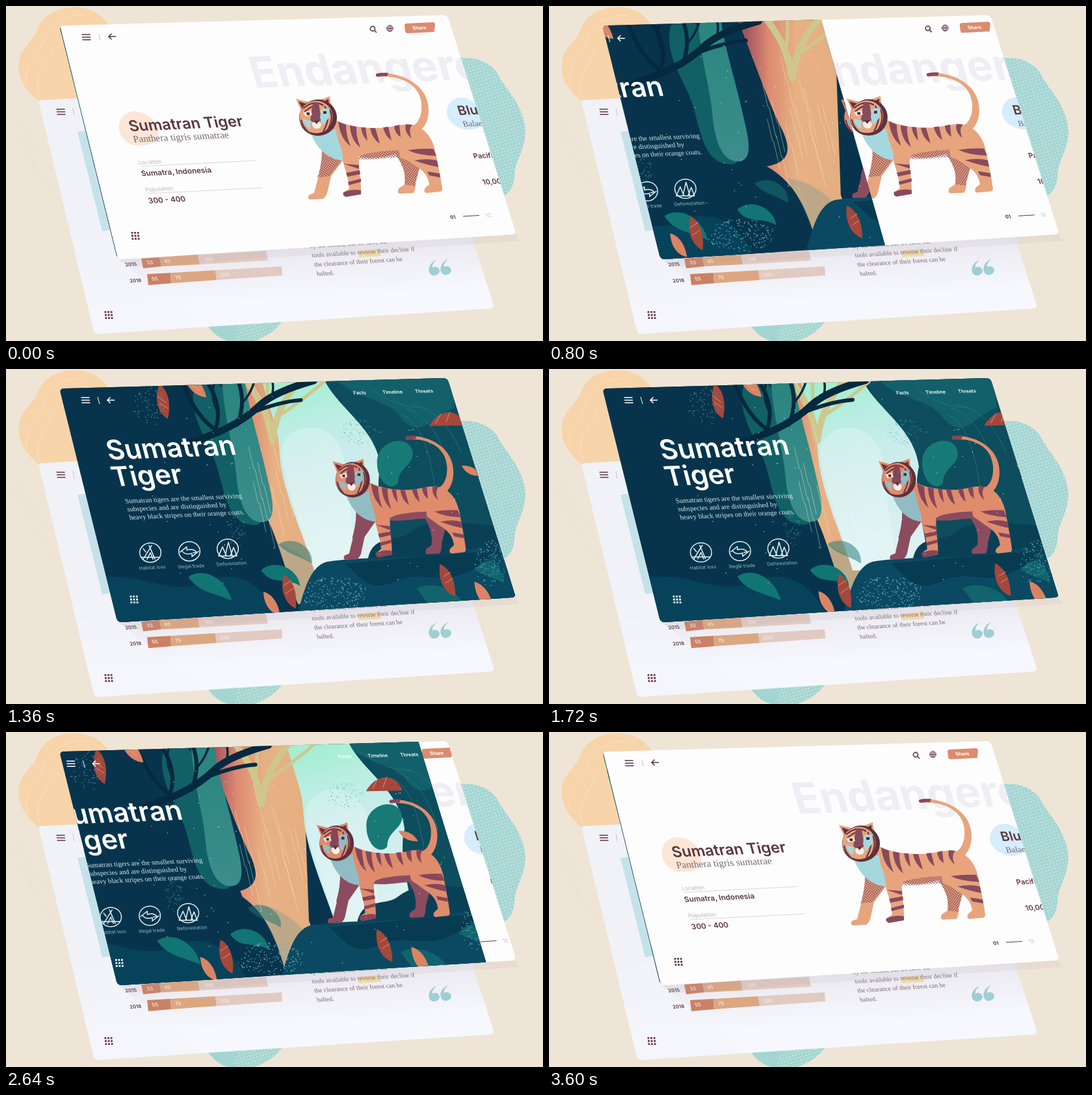
Write an HTML page that moves like this. It is 826 by 516 pixels and loops after 3640 ms.

```html
<!DOCTYPE html>
<html lang="en">
<head>
<meta charset="utf-8">
<title>Endangered species</title>
<style>
html, body { margin: 0; width: 100%; height: 100%; overflow: hidden; background: #efe5d6 }
svg { display: block; width: 826px; height: 516px }
text { font-family: Inter, sans-serif }
.serif { font-family: "Liberation Serif", serif }
.line { fill: none; stroke: currentColor; stroke-width: 1.6 }
.round { stroke-linecap: round; stroke-linejoin: round }
#whiteTiger { --fur: #e8a47d; --far: #e8a47d; --spots: url(#stipple); --chest: #a5d8de; --stripe: #874b5c }
#darkTiger { --fur: #de8c6c; --far: #8c4c60; --spots: #8c4c60; --chest: #92bcc4; --stripe: #874559 }
</style>
</head>
<body>
<svg viewBox="0 0 826 516">
<defs>
  <path id="sheet" d="M90 30L672 14Q679 14 681 20L783 345Q785 351 778 352L178 390Q172 390 170 384L84 37Q82 30 90 30Z"/>
  <clipPath id="card"><use href="#sheet"/></clipPath>
  <clipPath id="reveal"><polygon id="wipe"/></clipPath>
  <pattern id="cream" width="7" height="7" patternUnits="userSpaceOnUse" patternTransform="rotate(28)">
    <circle cx="2" cy="2" r="1.05" fill="#e9e6d6"/><circle cx="5.5" cy="5.3" r="1.05" fill="#e9e6d6"/>
  </pattern>
  <pattern id="stipple" width="3" height="3" patternUnits="userSpaceOnUse" patternTransform="rotate(35)">
    <rect width="1.9" height="1.9" fill="#874b5c"/>
  </pattern>
  <linearGradient id="shade" x1="0" y1="0" x2=".1" y2="1">
    <stop offset=".55" stop-color="#dedce2"/><stop offset=".72" stop-color="#eceaf0"/><stop offset=".9" stop-color="#f6f8fd"/>
  </linearGradient>
  <linearGradient id="bark">
    <stop offset=".1" stop-color="#a35560"/><stop offset=".3" stop-color="#dc8a70"/><stop offset=".55" stop-color="#e7b184"/><stop offset="1" stop-color="#e4ae80"/>
  </linearGradient>
  <linearGradient id="sky" x1="0" y1="0" x2=".2" y2="1">
    <stop offset="0" stop-color="#98edc9"/><stop offset=".3" stop-color="#b8eee0"/><stop offset=".5" stop-color="#c9eceb"/><stop offset="1" stop-color="#dcf1f2"/>
  </linearGradient>
  <linearGradient id="haze" x1="0" y1="0" x2="0" y2="1">
    <stop offset="0" stop-color="#2a857f"/><stop offset="1" stop-color="#3b8d8c"/>
  </linearGradient>
  <path id="menu" class="line" d="M-6.5-4H6.5M-6 0H7M-5.5 4H7.5"/>
  <path id="back" class="line" d="M6 0H-5M-.5-4.5L-5 0L-.5 4.5"/>
  <path id="grid" fill="none" stroke="currentColor" stroke-width="2.8" stroke-dasharray="2.8 1.8" d="M-6.5-4.6h12.1M-6 0h12.1M-5.5 4.6h12.1"/>
  <path id="leaf" d="M-4-27C8-18 15 0 9 27C-3 20-14 2-4-27Z"/>
  <path id="quote" d="M-2-11C-12-7-17 4-11 11C-4 17 6 9 2 3C-1-1-5-1-8 1C-9-3-6-7-2-11Z"/>

  <g id="tiger">
    <path fill="var(--fur)" d="M570 104C602 100 650 118 650 160C650 190 630 200 616 197L610 186C630 190 641 174 639 150C636 118 602 106 571 109Z"/>
    <path fill="var(--stripe)" d="M570 104Q580 102 588 103L586 108Q578 108 571 109Q567 107 570 104Z"/>
    <path fill="var(--far)" d="M486 222C486 250 478 270 474 288L466 291Q463 297 468 298L488 297Q493 292 494 288L500 262L518 238L510 215Z"/>
    <path fill="var(--spots)" d="M486 222C486 240 482 254 479 264L498 262L516 238Z"/>
    <path fill="var(--far)" d="M598 225C606 240 616 252 613 275L604 281Q601 288 606 289L627 288Q631 280 630 272L638 244Z"/>
    <path fill="var(--spots)" d="M600 230C608 242 616 254 613 275L629 277L636 247Z"/>
    <path fill="var(--fur)" d="M500 172C520 184 545 188 570 188C595 188 610 179 628 184C646 189 656 205 660 222C664 242 668 260 671 281Q671 286 667 286L647 288Q641 286 645 280L651 275C649 260 640 252 630 246C618 239 608 230 600 228C580 234 560 236 543 232C542 255 547 270 546 290L523 294Q517 292 521 286L528 281C526 260 520 248 518 238C500 236 480 210 470 196Z"/>
    <path fill="var(--spots)" d="M543 236C540 228 566 224 604 222L606 233C585 233 570 238 543 236Z"/>
    <path fill="var(--chest)" d="M468 194C476 216 492 236 518 238C520 222 508 208 508 190Z"/>
    <g fill="var(--stripe)">
      <path d="M511 178L523 183Q523 200 530 216Q514 204 511 178ZM529 184L539 186Q538 200 545 218Q530 206 529 184ZM546 187L553 187L556 208Q548 200 546 187ZM560 188L568 188L575 212Q563 204 560 188ZM580 187L588 186L593 207Q583 200 580 187ZM597 185L605 183L607 202Q598 196 597 185ZM615 182L625 183Q618 190 624 204Q612 194 615 182Z"/>
      <path d="M657 220Q638 219 618 222Q634 230 662 231ZM663 238Q648 234 628 238Q648 245 665 248ZM667 258L648 255L651 261L668 264ZM519 243L543 245L543 251ZM523 257L544 253L545 259L525 263ZM526 271L546 266L546 271L527 276ZM519 287Q534 281 546 284L546 290L523 294Q517 292 519 287Z"/>
    </g>
    <path fill="var(--fur)" d="M446 143L466 148L456 166ZM479 146L498 139L501 162Z"/>
    <path fill="#6a3442" d="M450 147L463 151L457 161ZM485 149L496 143L497 159Z"/>
    <ellipse cx="480" cy="172" rx="29" ry="28" fill="#5d303d"/>
    <ellipse cx="477" cy="171" rx="25.5" ry="25" fill="var(--fur)"/>
    <g fill="none" stroke="#6a3442" stroke-width="2.2">
      <path d="M457 158Q473 144 488 153M459 163Q473 151 480 155M496 157Q506 171 495 190M490 154Q501 172 488 193M454 175Q456 186 464 193"/>
    </g>
    <path fill="var(--stripe)" d="M472 149L481 149L485 176L475 181L468 176Z"/>
    <path fill="#f1e5d9" d="M457 164L469 161L471 168L461 170ZM484 161L496 158L494 167L485 169Z"/>
    <path fill="var(--chest)" d="M485 159L498 157L497 172L487 184L483 172ZM456 174L469 177L468 190Q459 185 456 174Z"/>
    <path fill="#4d2936" d="M462 164h5v4h-4ZM488 162h5v4h-5Z"/>
    <path fill="#f6eee6" d="M471 180Q478 175 485 181Q485 190 477 189Q470 187 471 180Z"/>
    <path fill="#5d303d" d="M473 177L482 176L478 182Z"/>
  </g>
</defs>

<rect width="826" height="516" fill="#efe5d6"/>
<path fill="#f8d4aa" d="M50 146C28 130 16 105 20 86C22 65 42 54 48 37C58 9 88 0 112 2C138 5 152 18 162 36L180 160Z"/>
<g fill="none" stroke="#fae1c3"><path d="M34 125C22 92 50 80 58 52C66 27 95 12 122 14M52 142C38 104 70 88 72 62"/><path stroke="#e8ddd0" d="M0 178C28 200 38 250 75 290M12 166C32 196 46 226 68 250"/></g>
<g id="teal"><path id="blob" fill="#a2d6d6" d="M690 82C715 76 745 84 757 106C768 128 792 148 798 184C802 220 782 236 782 262C780 286 768 298 740 297L690 250Z"/><use href="#blob" style="fill:url(#cream)"/>
<path d="M690 82C715 76 745 84 757 106C768 128 792 148 798 184C802 220 782 236 782 262C780 286 768 298 740 297L690 250Z" fill="url(#cream)"/></g>
<path fill="#a3d6d2" d="M300 480C315 498 322 512 346 517H378C396 512 418 500 428 480Z"/>
<path fill="url(#cream)" d="M360 480L350 517H378C396 512 418 500 428 480Z"/>

<g id="rear" color="#6a3444">
  <path fill="url(#shade)" d="M56 145L640 120L750 460Q751 465 745 466L142 505Q137 505 135 500L51 151Q49 145 56 145Z"/>
  <path fill="#f4f6fc" d="M56 145L110 142L176 392L300 494L142 505Q137 505 135 500L51 151Q49 145 56 145Z" opacity=".85"/>
  <path fill="#c5e2ea" d="M110 194L125 192L162 345L148 347Z"/>
  <use href="#menu" x="84" y="163"/><path stroke="#cfc5cb" d="M103 157L105 169"/>
  <use href="#grid" x="158" y="476"/>
  <path fill="#cb8166" d="M208 389L236 387L239 401L211 404ZM217 413L253 411L254 427L219 430Z"/>
  <path fill="#dca780" d="M236 387L295 383L298 398L239 401ZM253 411L322 407L324 422L254 427Z"/>
  <path fill="#e0cac2" d="M295 383L400 377L403 392L298 398ZM322 407L424 401L425 415L324 422Z"/>
  <path fill="#f0d9ad" d="M541 377L574 374L577 385L543 387Z"/>
  <g fill="#9fced3"><use href="#quote" x="664" y="402"/><use href="#quote" x="682" y="401"/></g>
</g>

<path d="M172 391L784 352L790 362L190 402Z" fill="#aaa0b0" opacity=".13"/>
<g clip-path="url(#card)">
  <use href="#sheet" fill="#fdfdfe"/>
  <g id="page" color="#5a3540">
    <g id="ghost"></g>
    <path fill="#fde6d5" d="M174 184C176 162 198 158 214 166C232 176 240 192 232 206C222 218 196 218 184 208C176 201 173 193 174 184Z"/>
    <path fill="#d5edfc" d="M678 162C680 142 700 136 716 146C732 156 738 170 732 182C722 195 700 192 688 182C681 176 678 170 678 162Z"/>
    <use href="#menu" x="123" y="48"/><path stroke="#cbbfc5" d="M143 43L145 53"/><use href="#back" x="163" y="47"/>
    <g class="line" stroke-width="1.2"><circle cx="564" cy="35" r="3.6"/><path d="M567 38L570 41"/><g stroke-width="1"><circle cx="590.500" cy="34.500" r="4.800"/><path d="M586 34.500H595M590.500 30V39M588.500 31Q586.500 35 589 39M592.500 31Q594 35 592 39"/></g></g>
    <path fill="#dc8b6e" d="M615 27L657 25Q659 25 660 28L659 39Q659 40 657 40L617 42Q615 42 614 39L613 29Z"/>
    <path stroke="#dcd5dc" d="M207 247L384 238M216 289L394 280"/>
    <use href="#grid" x="199" y="354"/>
    <path stroke="#5a3540" d="M703 324L728 322.500"/>
  </g>
  <use id="whiteTiger" href="#tiger"/>

  <g clip-path="url(#reveal)">
    <rect width="826" height="516" fill="#07344c"/>
    <g data-k="-.1"><path fill="#0d4d5d" d="M470 0H826V400H520C590 280 560 100 470 0Z"/><path fill="#126069" d="M500 0C520 50 590 40 610 78C640 110 660 70 690 60V0Z"/></g>
    <g data-k=".18">
      <path fill="url(#bark)" d="M318 10H470L480 290Q500 340 470 362H442C430 315 410 270 366 246C400 240 405 222 390 190C370 150 345 80 318 10Z"/>
      <path fill="#9fa18c" opacity=".55" d="M396 264C425 266 460 285 482 318L488 345Q472 366 442 362C430 320 415 292 396 264Z"/>
    </g>
    <g data-k="-.45">
      <path fill="url(#sky)" d="M392 0H485C500 56 570 84 578 150C566 200 592 250 592 310H476C452 235 424 180 422 120C420 84 404 60 392 0Z"/>
      <path fill="#fff" opacity=".22" d="M426 130C424 84 500 70 520 130C532 200 530 250 550 310H476C460 245 432 190 426 130Z"/>
    </g>
    <g data-k=".2">
      <g class="round" fill="none" stroke="#cec78d"><path stroke-width="10" d="M407 105C403 75 394 52 370 20M409 110C414 70 426 48 452 15"/><path stroke-width="5" d="M414 75Q440 60 488 20M399 65Q404 36 400 15"/></g>
      <path fill="#177a76" d="M570 145C568 112 615 98 624 125C630 148 602 150 602 176C590 190 570 172 570 145Z"/>
      <g fill="none" stroke="#2a8584" stroke-width=".8" opacity=".8"><path d="M606 70Q646 80 660 190M614 60Q660 75 680 150M622 55Q670 60 700 130M560 30Q600 60 640 60"/></g>
      <path fill="#0a4055" d="M555 300C560 250 600 270 620 252C650 230 690 235 780 245V320Z"/>
    </g>
    <g data-k=".58">
      <path fill="#07344c" d="M60 0H345L355 120L375 190L402 235C430 300 440 370 470 400H60Z"/>
      <path fill="#116066" d="M288 26C345 0 345 70 362 110C385 160 400 238 385 240C340 244 335 195 322 150C312 115 275 70 288 26Z"/>
      <path fill="url(#haze)" d="M330 20H365C374 74 388 112 403 182C412 220 408 236 390 236C365 235 355 200 352 165C348 120 334 80 330 20Z"/>
      <path fill="#1b7774" d="M417 270C440 255 472 275 468 300C446 286 430 286 417 270Z" opacity=".5"/>
      <path fill="#06435a" d="M80 338C180 290 240 355 300 330C350 304 400 330 424 400H80Z"/>
      <path fill="#117574" d="M278 320C300 305 335 320 345 357C320 345 294 345 278 320ZM390 310C410 292 446 306 450 334C428 320 406 334 390 310Z"/>
    </g>
    <g data-k=".85">
      <g class="round" fill="none" stroke="#05293f"><path stroke-width="11" d="M268 118C320 100 355 87 388 55Q410 35 470 18"/><path stroke-width="6" d="M352 86Q368 48 350 10M315 102Q335 60 302 15M378 66Q420 50 450 48M325 98Q288 76 268 20"/><path stroke-width="3.500" d="M362 50Q376 34 380 12M320 62Q310 40 318 18M405 43Q410 26 404 14"/></g>
    </g>
    <g data-k=".3">
      <path fill="#0a4961" d="M440 400C456 350 462 306 492 297C560 286 640 296 710 278C750 270 790 300 810 400Z"/>
      <path fill="#07374f" d="M520 300C545 320 555 345 595 328C640 308 660 332 700 316C720 308 740 298 750 280L650 288Z" opacity=".8"/>
      <path fill="#15706f" d="M630 338C655 325 690 340 700 358L650 364ZM720 310C735 285 760 295 765 330Z" opacity=".7"/>
      <use id="darkTiger" href="#tiger" transform="translate(94.800 2) scale(.911 .98)"/>
    </g>
    <g data-k=".25" id="sparks"></g>
    <g data-k="1.180" id="fore">
      <g fill="#a5483c"><use href="#leaf" x="235" y="50"/><use href="#leaf" transform="translate(429 343) rotate(-6)"/><use href="#leaf" transform="translate(672 326) rotate(-12)"/></g>
      <g fill="#db8464"><use href="#leaf" transform="translate(283 24) rotate(-28)"/><use href="#leaf" transform="translate(402 362) rotate(-22) scale(.8)"/><use href="#leaf" transform="translate(728 349) rotate(-22) scale(.9)"/></g>
      <path fill="#a5483c" d="M646 88C660 62 690 58 702 87Z"/><path fill="#db8464" d="M696 149Q716 148 726 165Q704 166 696 149Z"/>
      <g fill="none" stroke="#f1b795" stroke-width=".7"><path d="M228 42l13 10M231 52l13 9M422 334l12-8M425 346l12-8M668 320l11-7M671 330l11-7M276 15l13 11M281 25l13 9M656 84l8-15M672 82l6-16"/></g>
    </g>
    <g data-k=".29" id="nav" color="#fff">
      <use href="#menu" x="122" y="48"/><path stroke="#fff" d="M141 43L144 54"/><use href="#back" x="161" y="48"/><use href="#grid" x="197" y="355"/>
    </g>
    <g data-k="1" id="title"></g>
    <g data-k=".74" id="facts">
      <g class="round" fill="none" stroke="#e4f1f3" stroke-width="1.500">
        <g id="rings"></g>
        <path d="M208 293L221 272M226 293L217 272M205 290H233M214 293L219 283L223 293M208 277l4 5M265 282l10-8v5q10-3 15 3l-5 1M293 281l-10 8v-5q-10 3-15-3M324 288l6-14 6 14ZM334 288l5-21 6 21ZM342 288l5-13 5 13Z"/>
      </g>
    </g>
  </g>
</g>
</svg>
<script>
const DURATION = 3640, $ = id => document.getElementById(id);
const mix = (a, b, p) => a + (b - a) * p;

const add = (parent, tag, attrs) => {
  const node = document.createElementNS("http://www.w3.org/2000/svg", tag);
  for (const name in attrs) node.setAttribute(name, attrs[name]);
  return $(parent).appendChild(node);
};

// Sets text into the tilted plane of the cards.
const write = (parent, x, y, size, fill, words, weight = 400, family = "") => {
  const rise = -.029 - .035 * Math.min(1, (y - 31) / 359), lean = .248 + .06 * (x - 83) / 600;
  add(parent, "text", {
    transform: `matrix(1 ${rise} ${lean} .98 ${x} ${y})`,
    "font-size": size, "font-weight": weight, fill, class: family
  }).textContent = words;
};

const ink = "#5a3540", pale = "#b9b4c4", gray = "#75666f";
write("ghost", 382, 126, 67, "#eeeef4", "Endangered", 700);
write("page", 191, 193, 23.5, ink, "Sumatran Tiger", 600);
write("page", 197, 210, 15.2, gray, "Panthera tigris sumatrae", 400, "serif");
write("page", 205, 244, 8.6, pale, "Location");
write("page", 209, 262, 11.6, ink, "Sumatra, Indonesia", 600);
write("page", 215, 286, 8.6, pale, "Population");
write("page", 220, 304, 11.6, ink, "300 - 400", 600);
write("page", 697, 168, 20, ink, "Blue Whale", 600);
write("page", 704, 186, 13, gray, "Balaenoptera musculus", 400, "serif");
write("page", 720, 235, 11, ink, "Pacific Ocean", 600);
write("page", 734, 275, 11, ink, "10,000 - 25,000", 600);
write("page", 684, 328, 7.5, ink, "01", 700);
write("page", 739, 325, 7.5, pale, "12");
write("page", 626, 36.5, 7.5, "#fff", "Share", 700);

["by the threats, but we have the", "tools available to reverse their decline if",
 "the clearance of their forest can be", "halted."].forEach((words, i) =>
  write("rear", 467.5 + 3.8 * i, 373 + 14.2 * i, 9.85, gray, words, 400, "serif"));
[[184, 401, "2015", ink], [191, 426, "2018", ink], [217, 398, "33"], [244, 396, "45"], [306, 393, "106"],
 [225, 423, "55"], [261, 421, "75"], [330, 417, "200"]].forEach(([x, y, words, fill]) =>
  write("rear", x, y, 7.6, fill || "#f6e8df", words, 600));

write("nav", 535, 39.5, 7.4, "#fff", "Facts", 600);
write("nav", 580, 38.5, 7.4, "#fff", "Timeline", 600);
write("nav", 630, 37, 7.4, "#fff", "Threats", 600);
write("title", 154, 140, 42.5, "#fff", "Sumatran", 600);
write("title", 162, 181, 42.5, "#fff", "Tiger", 600);
["Sumatran tigers are the smallest surviving", "subspecies and are distinguished by",
 "heavy black stripes on their orange coats."].forEach((words, i) =>
  write("facts", 181 + 3.2 * i, 207 + 12.6 * i, 10.7, "#dcebee", words, 400, "serif"));
[[219, 283, "Habitat loss"], [279, 281, "Illegal trade"], [338, 277, "Deforestation"]].forEach(([x, y, words]) => {
  add("rings", "ellipse", { cx: x, cy: y, rx: 16.3, ry: 14.8 });
  write("facts", x - 16.5, y + 26.5, 7.3, "#8fbac4", words);
});

let seed = 7;
const random = () => (seed = seed * 16807 % 2147483647) / 2147483647;
const scatter = (parent, cx, cy, rx, ry, count, stroke, width) => {
  let d = "";
  while (count--) {
    const a = random() * 6.283, r = Math.sqrt(random());
    d += `M${(cx + rx * r * Math.cos(a)).toFixed(1)} ${(cy + ry * r * Math.sin(a)).toFixed(1)}h.01`;
  }
  add(parent, "path", { d, stroke, "stroke-width": width, class: "round" });
};
scatter("sparks", 440, 200, 260, 170, 75, "#d9f2ee", 1.3);
scatter("sparks", 540, 98, 28, 20, 65, "#58b0bb", 1.3);
scatter("sparks", 745, 300, 26, 36, 140, "#68b6bf", 1.4);
scatter("fore", 215, 58, 24, 34, 65, "#559eaa", 1.5);
scatter("fore", 350, 248, 14, 26, 60, "#4793a1", 1.3);
scatter("fore", 500, 346, 52, 26, 190, "#65b0bf", 1.6);
for (let i = 0; i < 14; i++) {
  const x = 372 + i * 7, y = 70 + random() * 130;
  add("sparks", "path", { d: `M${x} ${y}l8 34l2 1l10 44`, fill: "none", stroke: "#f8e4c6", "stroke-width": .7, opacity: .65 });
}

const drift = [[0, -430], [200, -390], [560, -300], [1040, -52], [1400, 8], [1720, 20],
  [2280, 0], [2960, -165], [3560, -340], [3700, -360]];
const slope = i => {
  const [a, b] = [drift[Math.max(0, i - 1)], drift[Math.min(drift.length - 1, i + 1)]];
  return (b[1] - a[1]) / (b[0] - a[0]);
};
const driftAt = t => {
  const i = drift.findIndex(key => key[0] > t) - 1, [t0, a] = drift[i], [t1, b] = drift[i + 1];
  const span = t1 - t0, p = (t - t0) / span, q = 1 - p;
  return q * q * ((1 + 2 * p) * a + p * span * slope(i)) + p * p * ((3 - 2 * p) * b - q * span * slope(i + 1));
};

const ease = (t, start) => {
  const p = Math.max(0, Math.min(1, (t - start) / 1247));
  return p < .5 ? 4 * p ** 3 : 1 - 4 * (1 - p) ** 3;
};
const slide = (node, x) => node.setAttribute("transform", `translate(${x} ${-.035 * x})`);
const layers = [...document.querySelectorAll("[data-k]")];

function draw() {
  const t = performance.now() % DURATION;
  const open = ease(t, 150) - ease(t, 2310), shift = driftAt(t);
  $("wipe").setAttribute("points",
    `0 0 ${mix(83, 679, open) - 8} 0 ${mix(83, 679, open)} ${mix(31, 14, open)} ` +
    `${mix(172, 784, open)} ${mix(390, 351, open)} ${mix(172, 784, open)} 516 0 516`);
  slide($("page"), 28 * Math.max(0, open) ** .7);
  slide($("whiteTiger"), 21 * open);
  for (const layer of layers) slide(layer, layer.dataset.k * (layer.id === "nav" ? Math.min(0, shift) : shift));
  requestAnimationFrame(draw);
}
draw();
</script>
</body>
</html>
```
